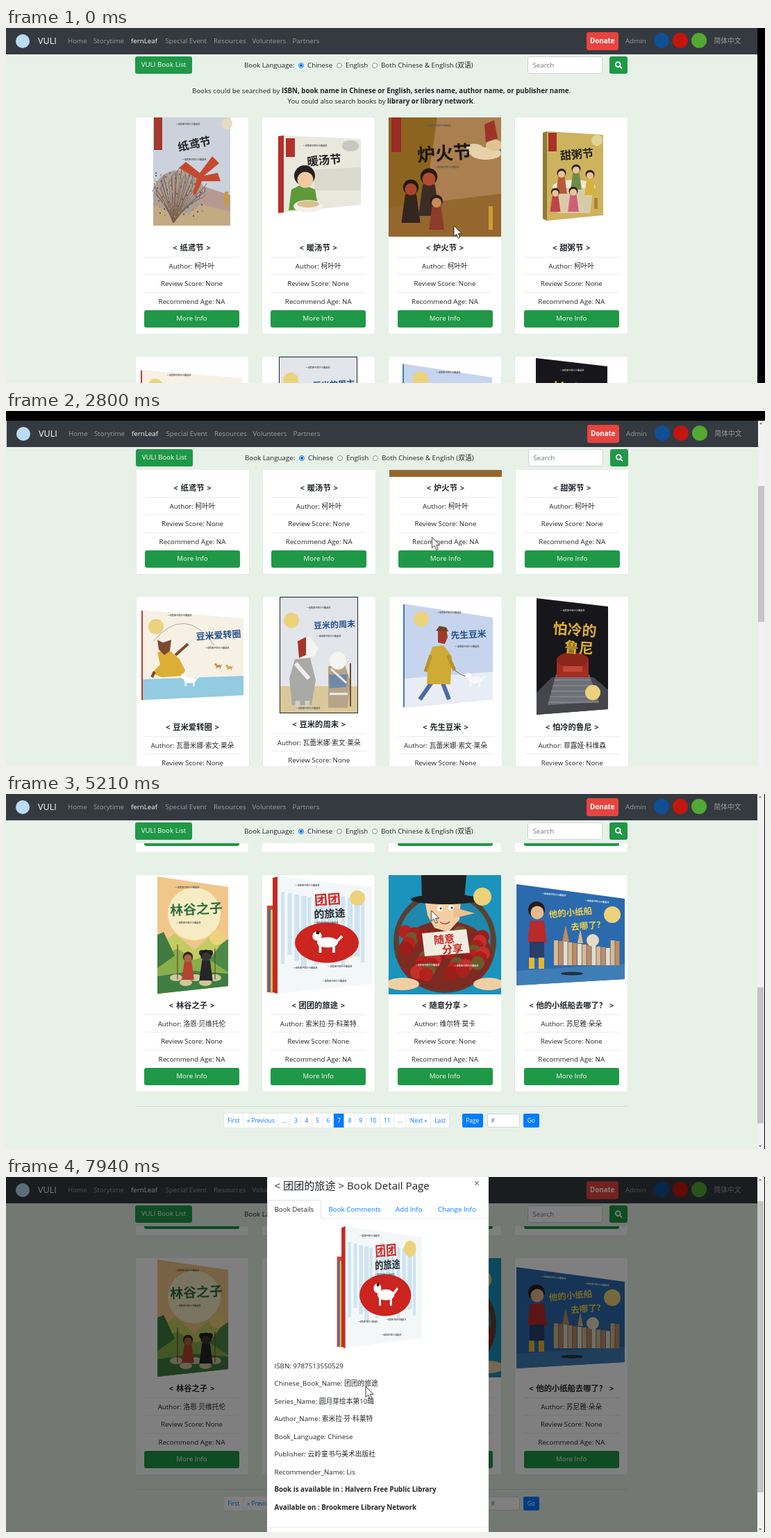
These frames come from a looping animation (1093x512 px, 8 s). An HTML page:

```html
<!DOCTYPE html>
<html lang="en">
<head>
<meta charset="utf-8">
<title>Book list</title>
<style>
@property --s { syntax: "<number>"; inherits: true; initial-value: 0; }
@property --m { syntax: "<number>"; inherits: true; initial-value: 0; }
@property --d { syntax: "<number>"; inherits: true; initial-value: -32; }
html, body { margin: 0; width: 100%; height: 100%; overflow: hidden; background: #000; }
body { position: relative; font: 9.75px/16px "Open Sans", "Noto Sans CJK SC", "Noto Sans CJK", sans-serif; color: #212529; }
body *, .page { position: absolute; box-sizing: border-box; }
b, svg * { position: static; }
.page, .shade, .wrap, .cursor, .go, .track { animation: 8s steps(1) infinite; }
.page { left: 0; top: 0; width: 1091.5px; height: 512px; overflow: hidden; background: #e7f1e8; box-shadow: -1px 0 #e7f1e8; animation-name: shift, scroll; }
.list { left: 0; top: 0; width: 100%; transform: translateY(calc(var(--s) * -1px)); }
.t { white-space: pre; }
.mid { transform: translateX(-50%); }
.top { left: 0; top: 0; width: 100%; height: 38px; background: #343a40; color: #9a9da0; }
.tools { left: 0; top: 38px; width: 100%; height: 32.5px; background: #e7f1e8; }
.tools > .btn, .tools > .field { top: 3.4px; height: 24.5px; line-height: 24.5px; }
.white { color: #fff; }
.brand { color: #fff; font-size: 12.6px; }
.btn { border-radius: 3px; background: #1f9847; color: #fff; text-align: center; }
.dot { border-radius: 50%; }
.field { border: 1px solid #ced4da; border-radius: 2.6px; background: #fff; color: #6c757d; padding-left: 7px; }
.radio { width: 8px; height: 8px; border: 1px solid #8a8f94; border-radius: 50%; background: #fff; }
.on { border: 1.3px solid #0b6fd8; background: radial-gradient(#0b6fd8 45%, #fff 55%); }
.card { width: 162px; height: 312px; background: #fff; border-radius: 2px; box-shadow: 0 0 1px rgba(0,0,0,.12); }
.card svg { left: 0; top: 0; }
.card .t { left: 81px; }
.name { font-size: 11.3px; font-weight: 700; word-spacing: .9px; }
.line { height: 1px; background: rgba(0,0,0,.08); }
.card .line { left: 12.5px; width: 137px; }
.card .btn { left: 12.5px; width: 137px; height: 24.5px; line-height: 24.5px; }
.go { animation-name: press; }
.pages { left: 314px; top: 1163px; height: 19.5px; display: flex; background: #fff; font-size: 8.45px; line-height: 19.5px; color: #007bff; border-radius: 2px; box-shadow: 0 0 0 .6px #dee2e6; }
.pages span { position: static; padding: 0 5.35px; box-shadow: inset -.6px 0 #dee2e6; }
.pages .now, .blue { background: #007bff; color: #fff; }
.small { top: 1163px; height: 19.5px; font-size: 8.45px; line-height: 19.5px; border-radius: 2px; text-align: center; }
.track { left: 1081.5px; top: 0; width: 10px; height: 512px; background: #f1f1f1; }
.page > .track { animation-name: strip; }
.track::before, .track::after { content: ""; position: absolute; left: 2.5px; border: 2.5px solid transparent; }
.track::before { top: 1px; border-bottom-color: #555; }
.track::after { bottom: 1px; border-top-color: #555; }
.thumb { left: .5px; width: 9px; background: #c4c4c4; }
.page > .track .thumb { top: 10px; height: 196px; transform: translateY(calc(var(--s) * .383px)); }
.shade { inset: 0; background: #000; opacity: 0; animation-name: dim; }
.wrap { inset: 0; opacity: 0; animation-name: modal; }
.wrap .thumb { top: 10px; height: 420px; transform: translateY(calc(var(--m) * .83px)); }
.dialog { left: 376px; top: 18px; width: 318.5px; height: 564px; background: #fff; transform: translateY(calc((var(--d) - var(--m)) * 1px)); }
.head { font-size: 15.1px; }
.close { font-size: 14px; font-weight: 600; color: #777; }
.link { color: #007bff; }
.tab { left: 0; top: 45px; width: 78px; height: 27px; border: 1px solid #dee2e6; border-bottom-color: #fff; border-radius: 3px 3px 0 0; }
.cursor { left: 0; top: 0; margin: -1px; animation-name: point; }

@keyframes shift {
  0%, 37.31% { transform: none; }
  1.375% { transform: translate(1px, 14px); }
}
@keyframes scroll {
  0% { --s: 0; }
  26.56% { --s: 0; animation-timing-function: steps(8, start); }
  35.96% { --s: 220; }
  37.31% { --s: 220; animation-timing-function: steps(7, start); }
  45.8% { --s: 384; }
  49.31% { --s: 384; animation-timing-function: steps(3, start); }
  53.06% { --s: 421; }
  54.31% { --s: 421; animation-timing-function: steps(9, start); }
  65.11%, 100% { --s: 702; }
}
@keyframes strip {
  0% { filter: brightness(0); visibility: visible; }
  1.375% { filter: none; visibility: visible; }
  83.3%, 100% { filter: none; visibility: hidden; }
}
@keyframes point {
  0% { translate: 645px 285px; }
  1.375% { translate: 230px -63px; }
  7.2% { translate: 230px -63px; animation-timing-function: steps(4, start); }
  11.87% { translate: 689px 190px; }
  19.31% { translate: 689px 190px; animation-timing-function: steps(5, start); }
  25.4% { translate: 612.5px 168px; }
  70.19% { translate: 612.5px 168px; animation-timing-function: steps(8, start); }
  79.6% { translate: 431px 407px; }
  87% { translate: 431px 407px; animation-timing-function: steps(5, start); }
  92.5%, 100% { translate: 518px 302px; }
}
@keyframes press {
  0% { background: #1f9847; box-shadow: none; }
  78.4% { background: #1b7f3a; box-shadow: none; }
  83.3%, 100% { background: #187536; box-shadow: 0 0 0 2px rgba(40,167,69,.5); }
}
@keyframes dim {
  0% { opacity: 0; }
  83.3% { opacity: .1; }
  84.5% { opacity: .21; }
  85.75%, 100% { opacity: .5; }
}
@keyframes modal {
  0% { opacity: 0; --m: 0; --d: -32; }
  85.75% { opacity: 0; --d: -32; animation-timing-function: steps(4, start); }
  90.5% { opacity: 1; --d: 0; }
  95.6% { --m: 7.5; }
  96.8% { --m: 15; }
  98% { --m: 22.5; }
  99.2%, 100% { --m: 30; opacity: 1; --d: 0; }
}
</style>
</head>
<body>
<div class="page">
  <div class="list"></div>
  <div class="tools">
    <div class="btn" style="left:186px;width:82px">VULI Book List</div>
    <div class="field" style="left:750.5px;width:108.5px;line-height:23px">Search</div>
    <div class="btn" style="left:869px;width:26px">
      <svg width="26" height="25" style="left:0;top:0" fill="none" stroke="#fff" stroke-width="1.8"><circle cx="12.3" cy="11.6" r="3.4"/><path d="M15 14.3l3 3"/></svg>
    </div>
  </div>
  <div class="top">
    <div class="btn" style="left:835.5px;top:6px;width:46.5px;height:26px;line-height:26px;background:#e8443f;font-weight:700">Donate</div>
  </div>
  <div class="track"><div class="thumb"></div></div>
  <div class="shade"></div>
  <div class="wrap">
    <div class="track"><div class="thumb"></div></div>
    <div class="dialog">
      <div class="line" style="left:0;top:71px;width:100%"></div>
      <div class="line" style="left:0;top:517px;width:100%"></div>
      <div class="tab"></div>
    </div>
  </div>
  <svg class="cursor" width="14" height="22" viewBox="-1 -1 14 22"><path d="M0 0V15.5L3.6 12.2L6.2 18.4L8.8 17.3L6.2 11.3H11Z" fill="#fff" stroke="#222" stroke-width=".9"/></svg>
</div>
<script>
const $ = q => document.querySelector(q);
const add = (el, html) => el.insertAdjacentHTML("beforeend", html);
const label = (x, y, text, cls = "") => `<span class="t ${cls}" style="left:${x}px;top:${y - 8}px">${text}</span>`;
const disc = (x, y, r, c) => `<i class="dot" style="left:${x - r}px;top:${y - r}px;width:${2 * r}px;height:${2 * r}px;background:${c}"></i>`;
const range = (n, f) => Array.from({ length: n }, (_, i) => f(i)).join("");

// SVG pieces for the covers
const P = (pts, f) => `<polygon points="${pts}" fill="${f}"/>`;
const R = (x, y, w, h, f) => `<rect x="${x}" y="${y}" width="${w}" height="${h}" fill="${f}"/>`;
const E = (x, y, rx, ry, f) => `<ellipse cx="${x}" cy="${y}" rx="${rx}" ry="${ry}" fill="${f}"/>`;
const C = (x, y, r, f) => E(x, y, r, r, f);
const L = (d, c, w = 1) => `<path d="${d}" fill="none" stroke="${c}" stroke-width="${w}"/>`;
const T = (x, y, s, text, f, rot = 0) => `<text x="${x}" y="${y}" font-size="${s}" font-weight="700" fill="${f}" text-anchor="middle" dominant-baseline="central" transform="rotate(${rot} ${x} ${y})">${text}</text>`;
const tiny = (x, y, f = "#555", rot = 0) => T(x, y, 3.2, "一本给孩子的小小图画书", f, rot);
const seal = (x, y, r = 11) => C(x, y, r, "#ecd27a");
const fig = (x, y, h, coat, skin, hair) =>
  P(`${x - h * .22},${y + h} ${x - h * .13},${y + h * .33} ${x + h * .13},${y + h * .33} ${x + h * .22},${y + h}`, coat) +
  C(x, y + h * .17, h * .18, hair) + C(x, y + h * .22, h * .14, skin);
const dog = (x, y, s, f) => E(x, y, s, s * .5, f) + C(x - s, y - s * .6, s * .45, f) +
  L(`M${x - s * .7} ${y}v${s}M${x + s * .6} ${y}v${s}M${x + s * .8} ${y}l${s * .6} ${-s * .6}`, f, s * .25);
const twig = i => {
  const a = -3 + i * .08, r = 26 + i * 7 % 15, x = 62 + r * Math.cos(a), y = 118 + r * Math.sin(a);
  return L(`M54 152Q${58 + 14 * Math.cos(a)} 126 ${x} ${y}m0 0l${-4 + i % 3 * 4} -6`, i % 3 ? "#5f5250" : "#b07a50", .8);
};

const covers = [
  R(25, 0, 111, 156, "#cbd2dc") + P("25,110 75,92 136,112 136,156 25,156", "#b59a94") + P("25,128 80,122 136,136 136,156 25,156", "#c2ab83") +
    E(62, 108, 36, 32, "#a9a09c") + range(38, twig) + range(70, i => C(29 + i * 29 % 68, 80 + i * 17 % 64, 1.2, i % 2 ? "#bd8858" : "#6b5d58")) +
    P("88,88 62,73 72,64 92,80 110,56 120,66 98,84 118,80 122,92 95,92 86,112 82,110", "#c24a30") +
    R(26, 0, 12, 47, "#a53a2e") + C(131, 9, 8, "#e5dcc0") + R(128, 107, 5, 22, "#c99a3f") + tiny(75, 10) + T(84, 38, 16, "纸鸢节", "#222", -12) + tiny(84, 61),
  P("23,27 31,26 31,137 23,138", "#b3302a") + P("31,26 142,31 142,126 31,137", "#e9e8dd") + P("75,75 142,72 142,105 75,105", "#d9d9cd") +
    P("38,134 42,104 58,96 76,104 80,126 76,132", "#5e9a3a") + C(61, 84, 15, "#25201e") + C(62, 90, 11.5, "#f0c9a0") + E(66, 128, 21, 9, "#f3f1e8") + E(66, 125, 16, 5, "#d9c08c") +
    R(34, 30, 13, 27, "#b3302a") + E(127, 41, 12, 8, "#c5c8bd") + tiny(76, 41) + T(89, 61, 16.5, "暖汤节", "#222", -5),
  R(0, 0, 162, 172, "#ab7f4f") + P("0,0 70,0 45,172 0,172", "#8c6420") + P("0,130 162,110 162,172 0,172", "#94672f") +
    E(140, 52, 22, 9, "#e6d2aa") + E(123, 46, 14, 8, "#e6d2aa") + E(152, 40, 12, 8, "#dfc393") + P("138,10 152,4 157,30 140,36", "#9c3328") +
    fig(32, 90, 62, "#33261f", "#a9442c", "#221a17") + fig(58, 74, 68, "#3d2c25", "#b34b30", "#221a17") + fig(69, 112, 50, "#8d3b2b", "#c98a5a", "#2c211d") +
    R(4, 0, 14, 50, "#9b2b26") + R(144, 128, 6, 34, "#d29a32") + tiny(72, 12) + T(80, 51, 26, "炉火节", "#1d1815", -4) + tiny(84, 72),
  P("40,22 46,20 46,149 40,146", "#8f7a35") + P("46,20 127,25 127,141 46,149", "#cdb35e") + E(85, 100, 31, 10, "#efe7d3") + P("56,102 113,102 108,138 62,138", "#d9cba8") +
    fig(67, 74, 36, "#b85a36", "#eac29a", "#30231d") + fig(88, 68, 36, "#6f8d4a", "#eac29a", "#30231d") + fig(108, 76, 36, "#d8b13c", "#eac29a", "#30231d") +
    fig(58, 102, 34, "#c1434a", "#eac29a", "#30231d") + fig(84, 100, 36, "#cf5f76", "#eac29a", "#30231d") + R(48, 22, 12, 27, "#a9312a") + C(118, 33, 8, "#e0d39a") + R(114, 116, 5, 16, "#b0812a") + T(89, 53, 16, "甜粥节", "#222", -5),
  P("7,19 154,31 154,142 7,149", "#f6f1e4") + P("7,119 154,114 154,142 7,149", "#92cbe2") + R(7, 20, 2, 129, "#c23b30") +
    P("30,80 46,76 62,90 70,106 66,114 36,116 22,110 34,98", "#dcae35") + P("30,62 38,66 50,62 48,78 40,84 32,76", "#7d4a30") + L("M56 84L74 68M26 108l-4 8", "#7d4a30", 4) + L("M24 64Q70 10 112 70", "#999", .8) +
    dog(77, 120, 9, "#fff") + dog(118, 100, 4, "#c58d5a") + dog(134, 102, 4, "#d5a94f") + seal(28, 43) + tiny(62, 27) + T(118, 55, 13, "豆米爱转圈", "#214f8c", -4) + tiny(116, 74),
  R(24, 0, 113, 168, "#222") + R(25, 1, 111, 166, "#e2e5ea") + R(25, 129, 111, 38, "#d9c99a") +
    P("46,90 68,88 76,120 70,156 42,156 38,118", "#a9a9a6") + L("M50 150v14M64 150v14", "#d8cdb8", 7) + P("52,62 68,58 80,74 74,86 56,88", "#f4f4f0") + P("50,64 62,58 62,84 52,88", "#a63527") + L("M47 96L66 118", "#eee", 6) +
    P("94,100 118,98 126,122 122,160 94,160", "#b7a489") + E(108, 92, 12, 13, "#f4f4f0") + P("95,112 122,112 120,130 96,132", "#6f8aa8") + L("M98 104L120 124M96 140H122", "#eee", 3) + L("M126 96V158", "#6d4a2c", 2) +
    seal(41, 34) + tiny(80, 16) + T(103, 40, 12, "豆米的周末", "#214f8c", -3) + tiny(95, 57) + tiny(65, 161),
  P("20,10 149,30 149,148 20,160", "#c7d4ee") + P("20,118 149,108 149,148 20,160", "#e8ecf4") + R(20, 11, 2, 148, "#3f7cb8") +
    L("M62 122L44 148M76 122L86 148", "#4d6aa3", 6) + P("62,72 78,70 90,86 88,126 54,126 56,92", "#cfaa35") + L("M60 84L52 108M84 84L94 106", "#b8922a", 5) + P("70,48 82,46 84,58 80,68 70,66", "#9e3a2a") + P("67,49 72,42 82,44 85,50", "#6c4424") + L("M94 106Q104 114 114 116", "#444", .8) +
    dog(124, 120, 10, "#f8f8f8") + seal(46, 32) + tiny(86, 23) + T(114, 54, 12.8, "先生豆米", "#214f8c", -3) + tiny(112, 72),
  P("30,2 133,14 133,162 30,170", "#17161a") + P("30,138 52,116 112,116 133,134 133,162 30,170", "#45464c") + P("58,112 106,112 120,152 46,156", "#6e7078") + range(5, i => L(`M${55 - i * 2} ${120 + i * 8}H${108 + i * 3}`, "#93959b", 1)) + R(59, 90, 46, 26, "#a32c20") + E(82, 91, 23, 11, "#8c261b") + R(68, 100, 28, 8, "#c2463a") +
    seal(111, 138) + tiny(82, 20, "#bbb") + T(85, 47, 21, "怕冷的", "#dcae35", 4) + T(91, 73, 21, "鲁尼", "#dcae35", 4),
  P("31,2 133,17 133,160 31,171", "#f1c68a") + C(84, 56, 38, "#f6ecc4") + P("31,104 56,84 84,108 112,84 133,102 133,160 31,171", "#c3cc62") + P("31,118 60,106 84,122 133,108 133,160 31,171", "#8aae4a") + P("31,86 40,82 56,116 31,134", "#3f7a40") + P("133,92 122,100 106,122 133,140", "#4d8a47") + P("31,146 82,138 133,142 133,160 31,171", "#3f7d43") + range(5, i => E(58 + i * 14, 148 + i % 2 * 7, 9, 5, "#cfc79a")) +
    fig(75, 111, 40, "#b54331", "#a8683f", "#3b241b") + C(95, 112, 4, "#25252a") + C(107, 112, 4, "#25252a") + fig(101, 108, 44, "#25252a", "#3a3532", "#1d1d20") + L("M60 100V150M114 106V150", "#6b4a2a", 1.2) + seal(117, 90) + tiny(74, 18) + T(87, 49, 19, "林谷之子", "#2f7040", -3) + tiny(76, 69),
  R(7, 44, 9, 125, "#d2432f") + R(9, 48, 3, 120, "#3d72b4") + R(12, 50, 3, 120, "#e6b938") + P("15,4 22,2 22,171 15,169", "#c22a24") + P("22,2 158,17 158,157 22,171", "#f4f7f8") +
    range(13, i => R(27 + i * 9.6, 24 + i * 13 % 11, 5 + i * 5 % 4, 104 - i * 37 % 22, "#cfe4f0")) + E(93, 97.5, 46, 29, "#cc241f") + dog(94, 97, 15, "#fff") + C(80, 83, 2.5, "#222") +
    seal(137, 33) + tiny(65, 15) + T(94, 35, 19, "团团", "#d02a24", -4) + T(97, 55, 15, "的旅途", "#26292d", -3) + tiny(92, 69) + tiny(62, 134) + tiny(112, 132) + tiny(104, 153),
  R(0, 0, 162, 172, "#1a93bd") + E(81, 96, 74, 74, "#5b4030") + E(81, 92, 66, 62, "#1f88ad") + E(81, 116, 68, 50, "#7c2a22") +
    range(40, i => C(24 + i * 37 % 115, 82 + i * 23 % 62, 10, ["#b5221d", "#9c1d1a", "#c4302a", "#a8201c", "#6b5a2c"][i * 7 % 5])) +
    P("52,36 104,36 102,64 86,82 66,76 56,58", "#f2cfa2") + P("92,46 124,55 94,62", "#eebf8f") + P("47,0 112,0 109,34 48,34", "#1e2023") + E(82, 35, 50, 7, "#1e2023") + C(74, 48, 4, "#fff") + C(90, 47, 4, "#fff") + C(75, 48, 1.5, "#222") + C(91, 47, 1.5, "#222") + L("M74 68Q82 73 88 67", "#a33", 1.2) +
    P("48,84 112,78 117,112 52,117", "#f1ece0") + T(80, 92, 15, "随意", "#c5261f", -5) + T(92, 106, 15, "分享", "#c5261f", -5) + E(20, 157, 24, 9, "#f2cfa2") + E(144, 157, 22, 9, "#f2cfa2") + seal(135, 31, 13) + tiny(56, 130, "#eee") + tiny(112, 131, "#eee"),
  P("2,13 158,34 158,150 2,159", "#2c6aae") + P("2,138 158,128 158,150 2,159", "#3f7db6") + range(14, i => R(56 + i * 6.8, 94 + i * 13 % 12, 6, 36 - i * 13 % 12, ["#d9b98a", "#c48a5c", "#e6dcc6"][i % 3])) + P("68,96 73,72 78,96", "#c48a5c") + C(112, 94, 9, "#e6dcc6") + P("90,98 94,78 98,98", "#d9b98a") + E(82, 142, 16, 2.5, "#23303f") +
    P("18,96 22,66 42,66 46,98", "#b92a28") + C(31, 50, 12, "#241c1b") + C(32, 54, 9.5, "#e7b98f") + R(21, 96, 21, 24, "#293d6a") + R(20, 119, 8, 16, "#e4b72f") + R(34, 119, 8, 16, "#e4b72f") + seal(140, 57, 12) + tiny(56, 28, "#fff", 5) + tiny(118, 38, "#fff", 5) + T(80, 54, 12.5, "他的小纸船", "#f0d24c", -5) + T(102, 73, 12.5, "去哪了?", "#f0d24c", -5)
];
const draw = (i, style = "") => `<svg width="162" height="173" viewBox="0 0 162 173" preserveAspectRatio="none" style="${style}">${covers[i]}</svg>`;

const leaf = "柯叶叶", vale = "瓦蕾米娜·索文·莱朵";
const books = [
  ["纸鸢节", leaf], ["暖汤节", leaf], ["炉火节", leaf], ["甜粥节", leaf],
  ["豆米爱转圈", vale], ["豆米的周末", vale], ["先生豆米", vale], ["怕冷的鲁尼", "菲露娅·科维森"],
  ["林谷之子", "洛恩·贝维托伦"], ["团团的旅途", "索米拉·芬·科莱特"], ["随意分享", "维尔特·莫卡"], ["他的小纸船去哪了？", "苏尼雅·朵朵"]
];
const list = $(".list");
add(list, label(540.5, 91, "Books could be searched by <b>ISBN, book name in Chinese or English, series name, author name, or publisher name</b>.", "mid") +
  label(540.5, 106, "You could also search books by <b>library or library network</b>.", "mid"));
books.forEach(([name, author], i) => {
  const up = i == 5 ? 4 : 0;
  const row = (y, text, cls = "") => label(81, y - up, text, "mid " + cls);
  add(list, `<div class="card" style="left:${186.5 + i % 4 * 182.25}px;top:${128.5 + Math.floor(i / 4) * 345}px">${draw(i)}` +
    row(188.4, `&lt; ${name} &gt;`, "name") + row(215.2, "Author: " + author) + row(240.8, "Review Score: None") + row(266.7, "Recommend Age: NA") +
    [201.5, 226.5, 252.5].map(y => `<div class="line" style="top:${y - up}px"></div>`).join("") +
    `<div class="btn ${i == 9 ? "go" : ""}" style="top:${278.6 - up}px">More Info</div></div>`);
});
const cells = ["First", "« Previous", "...", 3, 4, 5, 6, 7, 8, 9, 10, 11, "...", "Next »", "Last"];
add(list, `<div class="line" style="left:186px;top:1152px;width:709px"></div>` +
  `<div class="pages">${cells.map(c => `<span class="t ${c == 7 ? "now" : ""}">${c}</span>`).join("")}</div>` +
  `<div class="small blue" style="left:656.5px;width:30.5px">Page</div>` +
  `<div class="small field" style="left:692.5px;width:47.5px;padding-left:5px;text-align:left;line-height:18px">#</div>` +
  `<div class="small blue" style="left:744.5px;width:23.5px">Go</div>`);

add($(".top"), disc(24, 19, 10, "#b9dcf2") + label(46, 19, "VULI", "brand") +
  [[89, "Home"], [126, "Storytime"], [180, "fernLeaf", "white"], [229.5, "Special Event"], [299, "Resources"], [354.5, "Volunteers"], [412.5, "Partners"], [892, "Admin"], [1019.5, "简体中文"]]
    .map(([x, text, cls]) => label(x, 19, text, cls)).join("") +
  disc(943.5, 18, 11, "#0f4f96") + disc(970.5, 18, 11, "#c4160f") + disc(998, 18, 11, "#52a832"));
add($(".tools"), [[343, "Book Language:"], [434, "Chinese"], [489, "English"], [540, "Both Chinese &amp; English (双语)"]].map(([x, text]) => label(x, 15.7, text)).join("") +
  [425, 480, 531].map((x, i) => `<i class="radio ${i ? "" : "on"}" style="left:${x - 4}px;top:11.5px"></i>`).join(""));

const details = ["ISBN: 9787513550529", "Chinese_Book_Name: 团团的旅途", "Series_Name: 圆月芽绘本第10辑", "Author_Name: 索米拉·芬·科莱特", "Book_Language: Chinese",
  "Publisher: 云岭童书与美术出版社", "Recommender_Name: Lis", "<b>Book is available in : Halvern Free Public Library</b>", "<b>Available on : Brookmere Library Network</b>"];
add($(".dialog"), label(10.5, 24, "&lt; 团团的旅途 &gt; Book Detail Page", "head") + label(298, 21, "×", "close") +
  label(10.5, 59, "Book Details") + [[88.5, "Book Comments"], [185, "Add Info"], [246, "Change Info"]].map(([x, text]) => label(x, 59, text, "link")).join("") +
  draw(9, "left:94.5px;top:81px;width:131px;height:180px") +
  details.map((text, i) => label(10.5, 284.5 + i * 25.57, text)).join(""));
</script>
</body>
</html>
```
